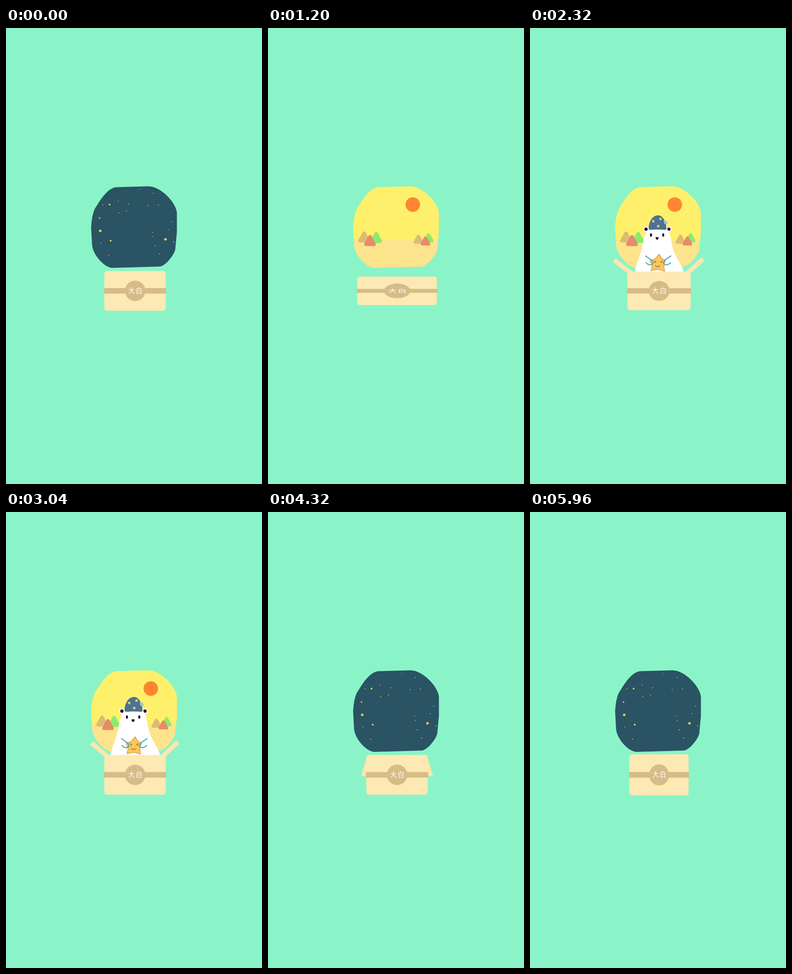
Animation of 561x998 px, one loop 6 s. Source, as an HTML page:

```html
<!DOCTYPE html>
<html lang="zh">
<head>
<meta charset="utf-8">
<title>Bear in a box</title>
<style>
  html, body { margin: 0; height: 100%; overflow: hidden; background: #8af4c8; }
  svg { display: block; width: 100vw; height: 100vh; }
  text { font: 300 15px "Noto Sans CJK SC", "Noto Sans CJK", sans-serif; fill: #fff; }
</style>
</head>
<body>
<svg viewBox="0 0 561 998">
  <defs>
    <path id="globe" d="M240 348.5L312 346.5C340 346.5 373 383 374.5 404V446L371 484C370 494 352 519 338 522L234 525C215 525 189 495 188.5 473L186.5 436Q188 410 194 397C204 381 220 352 240 348.5Z"/>
    <path id="hill" d="M0-8L-8.7 8H8.7Z" stroke-width="8" stroke-linejoin="round"/>
    <path id="spark" d="M0-4L1.2-1.3 4-1 1.9.9 2.5 3.6 0 2.2-2.5 3.6-1.9.9-4-1-1.2-1.3Z" fill="#f3cf6b"/>
    <clipPath id="inGlobe"><use href="#globe"/></clipPath>
    <clipPath id="aboveFloor"><path d="M0 0H561V600H0Z"/></clipPath>
    <filter id="blur" x="-10%" y="-15%" width="120%" height="130%"><feGaussianBlur stdDeviation="0"/></filter>
  </defs>

  <g id="day" clip-path="url(#inGlobe)">
    <path d="M180 340H380V464H180Z" fill="#fff06b"/>
    <path d="M180 463H380V530H180Z" fill="#fde48c"/>
    <circle cx="317.3" cy="386.5" r="15.9" fill="#ff8533"/>
    <g id="hills"></g>
  </g>
  <g id="night"><use href="#globe" fill="#2a5363"/></g>

  <g clip-path="url(#aboveFloor)">
    <g id="bear">
      <g fill="#fff"><circle cx="254" cy="436" r="6.2"/><circle cx="304.5" cy="436" r="6.2"/></g>
      <g fill="#2c0b3d"><circle cx="254" cy="436" r="3.7"/><circle cx="304.5" cy="436" r="3.7"/></g>
      <path fill="#fff" d="M260 436Q281 428 301 436C309 447 309 462 313 478C321 506 340 520 340 548C340 576 318 586 284 586C250 586 228 576 228 548C228 520 240 502 245 478C249 462 249 447 260 436Z"/>
      <g id="open" fill="#2c0b3d"><ellipse cx="265" cy="449" rx="2.3" ry="3.8"/><ellipse cx="292" cy="449" rx="2.3" ry="3.8"/></g>
      <path id="shut" d="M262.5 458h5M289.5 458h5" stroke="#c4c4ca" stroke-width="2"/>
      <path fill="#2c0b3d" d="M275 455.5Q276 452.8 278.5 454Q281 452.8 282 455.5Q281.5 459 278.5 460Q275.5 459 275 455.5Z"/>
      <path fill="#4a7394" d="M260 435C260 419 268 405 281 405C291 405 299 419 299 435Q299 437.500 296 437.500Q280 436 264 437.500Q260 437.500 260 435Z"/>
      <path fill="#a9bfc8" d="M293 416Q302 417 302 423Q298 428 294 423Z"/>
      <use href="#spark" x="270" y="418"/><use href="#spark" x="286" y="413"/><use href="#spark" x="281" y="429"/>
      <path fill="#f9c75e" stroke="#dfa24f" stroke-width="1.6" stroke-linejoin="round" d="M283 492L289 502 297 506 293 515 295 530 280 526 265 529 268 517 263 507 275 502Z"/>
      <g fill="none" stroke-linecap="round" stroke-linejoin="round">
        <path stroke="#a8692f" stroke-width="1.3" d="M272 507l4 2-4 2M290 507l-4 2 4 2M275 517q1 6 4.500 1.500q3 5 5-1.500"/>
        <path stroke="#4aa2ae" stroke-width="2.1" d="M253 496L267 506Q272 514 265 516Q258 516 254 511M309 496L295 506Q290 514 297 516Q304 516 308 511"/>
      </g>
    </g>
  </g>

  <g id="box">
    <g stroke="#fde6ae" stroke-width="10">
      <path id="lidL" d="M222 534.500L187.500 505.500"/>
      <path id="lidR" d="M343.500 534.500L376.500 503.500"/>
    </g>
    <rect x="215.500" y="531.700" width="134.500" height="87" rx="6" fill="#fde9b3"/>
    <path fill="#d6bc87" d="M214.500 569.300H351V581.300H214.500Z"/>
    <circle cx="283" cy="575.300" r="22.400" fill="#d6bc87"/>
    <text x="267.500 284" y="580">大白</text>
  </g>
</svg>
<script>
const $ = id => document.getElementById(id);
const set = (id, name, value) => $(id).setAttribute(name, value);
const clamp = v => Math.min(1, Math.max(0, v));
const ramp = (t, a, b) => clamp((t - a) / (b - a));
const ease = p => p * p * (3 - 2 * p);
const mix = (a, b, p) => a + (b - a) * p;
const wave = ms => Math.cos(2 * Math.PI * ms / 500);

$('night').innerHTML += [
  [206.5, 444, 2.8], [349.5, 462.5, 2.8], [227, 386.5, 2], [229.5, 465.5, 2], [205, 416, 1.7],
  [292.5, 353.5, .8], [322.5, 362, .9], [246, 379, .9], [212.5, 387, 1], [268.5, 384.5, 1.1],
  [264, 400.5, 1.1], [247, 404.5, 1.1], [311.5, 388.5, 1], [334, 387.5, 1.1], [363, 424.5, .9],
  [355.5, 441.5, .9], [321, 447, .9], [322.5, 456.5, .9], [327, 476.5, 1.1], [336.5, 494.5, 1.1],
  [367.5, 468, 1.1], [208, 470.5, .9], [225, 497, 1]
].map(([x, y, r]) => `<circle cx="${x}" cy="${y}" r="${r}" fill="#f1c75b"/>`).join('');

$('hills').innerHTML = [
  [210.5, 457.5, 1, '#ddbb72'], [237, 458.5, 1, '#8ceb6e'], [223.5, 465.3, 1, '#e68a6c'],
  [329.5, 462, .83, '#ddbb72'], [352, 459, .83, '#8ceb6e'], [345, 466, .83, '#e68a6c']
].map(([x, y, s, c]) =>
  `<use href="#hill" transform="translate(${x} ${y}) scale(${s})" fill="${c}" stroke="${c}"/>`).join('');

// Each hit: start, time of widest pose, extra width there
const hits = [[40, 425, .69], [1080, 1240, .36], [4480, 4670, .34]];
const REBOUND = 250;
const ring = ms => -.25 * Math.exp(-.00175 * ms) * wave(ms);

function squash(t) {
  if (t < 40 || t > 3000 && t < 4480) return 0;
  const [start, wide, amp] = hits.filter(h => h[0] <= t).pop();
  const peak = wide + REBOUND;
  if (t < wide) return mix(squash(start - 1), amp, ease(ramp(t, start, wide)));
  if (t < peak) return mix(amp, -.25, ease(ramp(t, wide, peak)));
  return ring(t - peak);
}

function drawBox(t) {
  const d = squash(t), h = Math.max(.5, 1 - .95 * d);
  set('box', 'transform', `translate(283 575.300) scale(${1 + d} ${h}) translate(-283 -575.300)`);
  const fold = 1 - ease(ramp(t, 1400, 1490)) + ease(ramp(t, 4040, 4400));
  set('lidL', 'transform', `rotate(${-130 * fold} 222 534.500)`);
  set('lidR', 'transform', `rotate(${133 * fold} 343.500 534.500)`);
}

function drawBear(t) {
  const top = 3600, half = 312, land = top + half;
  let sy = 1, pivot = 625;
  if (t < 1650) sy = 1.24 * ease(ramp(t, 1400, 1650));
  else if (t < 3100) sy = 1 + .24 * Math.exp(-.0026 * (t - 1650)) * wave(t - 1650);
  else if (t > land) {
    sy = mix(1, .01, ramp(t, land, 4080));
    pivot = 567;
  }
  const sx = t > land ? 1 : 1 + .35 * (sy - 1);
  const u = (t - top) / half, flying = Math.abs(u) < 1;
  const lift = flying ? -142 * (1 - u * u) : 0;
  set('bear', 'visibility', t > 1400 ? 'visible' : 'hidden');
  set('bear', 'transform', `translate(281 ${pivot + lift}) scale(${sx} ${sy}) translate(-281 ${-pivot})`);
  set('bear', 'filter', flying ? 'url(#blur)' : 'none');
  $('blur').firstChild.setAttribute('stdDeviation', `0.4 ${Math.abs(u) * 3.4}`);
  const asleep = t < 1920;
  set('open', 'visibility', asleep ? 'hidden' : 'inherit');
  set('shut', 'visibility', asleep ? 'inherit' : 'hidden');
}

function draw(now) {
  const t = Math.floor(now % 6000 / 40) * 40;
  const light = ramp(t, 170, 1170) - ramp(t, 3220, 4220);
  set('day', 'opacity', light);
  set('night', 'opacity', 1 - light);
  drawBear(t);
  drawBox(t);
}

let begin;
function tick(now) {
  begin ??= now;
  draw(now - begin);
  requestAnimationFrame(tick);
}
draw(0);
requestAnimationFrame(tick);
</script>
</body>
</html>
```
